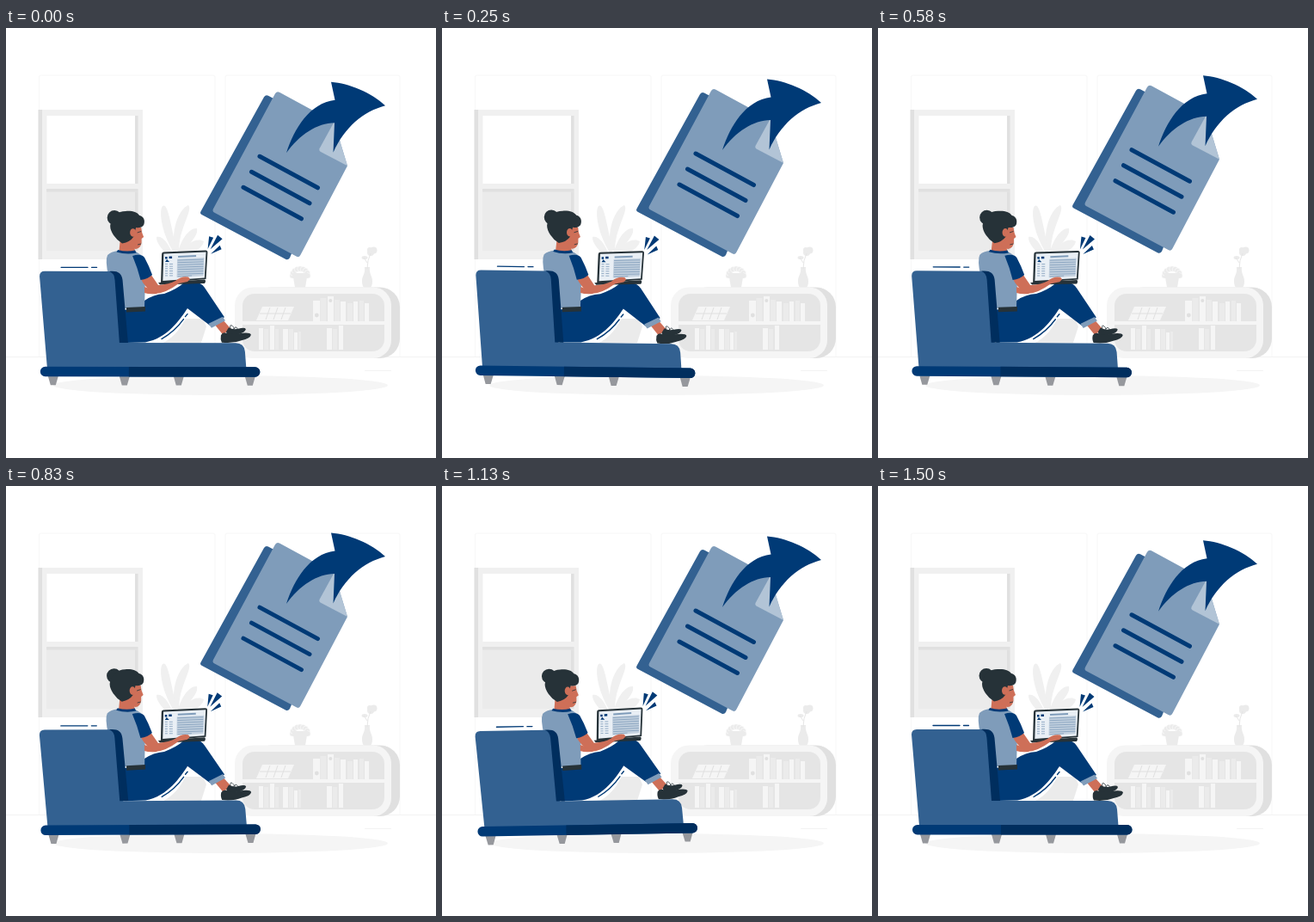
These frames come from a looping animation (500x500 px, 1540 ms). An HTML page:

```html
<!DOCTYPE html>
<html lang="en">
<head>
<meta charset="utf-8">
<title>Sharing a document from the sofa</title>
<style>
  html, body { margin: 0; width: 100%; height: 100%; overflow: hidden; background: #fff; }
  svg { display: block; width: 100%; height: 100%; }
  .navy { fill: #003a76; }
  .deep { fill: #002e5e; }
  .mid { fill: #336191; }
  .soft { fill: #7f9cba; }
  .dark { fill: #263238; }
  .skin { fill: #ce6f58; }
  .g1 { fill: #f5f5f5; }
  .g2 { fill: #f0f0f0; }
  .g3 { fill: #ebebeb; }
  .g4 { fill: #e0e0e0; }
  .line { fill: none; stroke: #003a76; stroke-linecap: round; }
</style>
</head>
<body>
<svg viewBox="0 0 500 500">
  <!-- Room -->
  <path d="M38.5 382V57q0-2 2-2H241q2 0 2 2V382M255 382V57q0-2 2-2H456q2 0 2 2V382" fill="none" stroke="#f7f7f7"/>
  <path d="M0 382.5H500M417 398.5H448" stroke="#f0f0f0" stroke-width=".8"/>

  <!-- Window -->
  <path class="g4" d="M37.5 95H60V269H37.5z"/>
  <path class="g2" d="M42 95H159V269H42z"/>
  <path fill="#fff" d="M47.5 102H150V181H47.5z"/>
  <path class="g4" d="M150 102h3.5v79H150zM47 187H153.5v4H47z"/>
  <path class="g3" d="M47 190.5H153.5V259H47z"/>
  <path class="g4" d="M150 190.5h3.5V259H150z"/>

  <!-- Potted plant -->
  <g class="g2">
    <path d="M196 262C182 242 177 213 182 207C189 202 192 235 199 258z"/>
    <path d="M197 258C191 238 200 211 212 206C218 212 201 232 201 260z"/>
    <path d="M194 264C189 249 181 241 175 243C174 250 184 260 192 268z"/>
    <path d="M199 264C203 246 213 232 222 233C224 243 211 251 203 267z"/>
    <path d="M201 268C208 250 222 243 230 248C228 259 213 261 203 272z"/>
  </g>
  <path class="g3" d="M176 338H229L233 347L227 366H181z"/>

  <!-- Bookshelf -->
  <rect class="g4" x="285" y="301.5" width="173" height="82.5" rx="23"/>
  <rect class="g1" x="266" y="301.5" width="182" height="82.5" rx="21"/>
  <rect x="275" y="309" width="165" height="67" rx="14" fill="#e5e5e5"/>
  <path class="g1" d="M275 341H440v4H275z"/>
  <path class="g1" d="M298 324H335L328 340H291z"/>
  <path d="M295 332H331M307 325L302 339M316 325L311 339M325 325L320 339" stroke="#e0e0e0" fill="none"/>
  <g id="books"></g>
  <g class="g4"><circle cx="361.3" cy="334" r="2.4"/><circle cx="377.3" cy="317" r="2"/></g>

  <!-- Ornaments -->
  <g class="g3">
    <path d="M334 290H350L348 301.5H336z"/>
    <g id="blooms"></g>
    <path d="M417 278H423C422 286 426 288 426 294Q426 301.5 423 301.5H417Q414 301.5 414 294C414 288 418 286 417 278z"/>
    <circle cx="424" cy="261" r="4"/><circle cx="427.5" cy="258.5" r="4"/><circle cx="423" cy="258" r="3"/>
    <ellipse cx="417" cy="267" rx="3.5" ry="2"/>
  </g>
  <path d="M420 280Q420 270 424 262M420 273L416 267" stroke="#e6e6e6" fill="none"/>

  <ellipse class="g1" cx="249.5" cy="415.5" rx="194.5" ry="11.5"/>

  <g id="sofa">
    <!-- Legs and shoes -->
    <path class="skin" d="M243 345L253 340L262 350L252 356z"/>
    <path class="dark" d="M256 353L259 348Q264 351 270 349.500Q278 347.500 279 350Q278 354 270 356L258 358z"/>
    <path class="dark" d="M250 357Q252 353 256 354.500Q263 357 271 355Q284 353 285 356.500Q284 361 274 363Q264 367 251 365.500Q249 362 250 357z"/>
    <path d="M261 349q-1-5 2-3t2 4q2-4 4-1t-3 2" fill="none" stroke="#263238" stroke-width=".8"/>
    <path fill="#fff" d="M160 366Q190 352 208 328L212 331Q201 357 183 366z"/>
    <path class="navy" d="M136 328L161 325V317Q171 310 184 309Q198 304 206 297L220 295.500Q227 296 231 302L254 336L237 345.500L211 326C203 338 188 361 162 365.500L138 366z"/>
    <path class="soft" d="M235.500 343.500L252 335.500L255 340L239 348.500z"/>
    <path class="line" d="M181 361.500Q196 353 206.500 338.500M208.500 335.500L211 332.500" stroke-width="1.4"/>

    <!-- Torso and head -->
    <path class="skin" d="M133 243H149V255L151 263H131z"/>
    <path class="soft" d="M130 259Q142 262 151 260L157 264L162 290L161 326H138L119 288Q115 270 118 264Q122 260 130 259z"/>
    <path class="navy" d="M130 258Q140 261 150 258.500L151.500 261.500Q140 264 128.500 260.500z"/>
    <path class="dark" d="M140 325L162 324V329.500L140 330.500z"/>
    <path class="skin" d="M144 232H157L158 238L160 243L157.500 245L157.500 250Q156 256.500 151 257Q144 257 141 249z"/>
    <path d="M152.500 238L157 236.500M153 252L157 251" stroke="#263238" stroke-width=".8"/>
    <circle class="dark" cx="126" cy="220.500" r="8.500"/>
    <path class="dark" d="M121 230C122 219 130 213 139 213C147 212.500 152 214 155 218C160 219 162 224 160 229Q157 233 151 232L148 243Q144 249 135 250.500Q129 247 125 241Q121 235 121 230z"/>
    <ellipse class="skin" cx="147.500" cy="238" rx="3.500" ry="4.800"/>

    <!-- Laptop -->
    <path class="dark" d="M177 296L231 292.500Q233 294 231 297L179 298.500z"/>
    <path class="dark" d="M183 260.500L232 258.500Q234.500 258.500 234.300 261L232.500 292L180 296.500L181 263Q181 260.700 183 260.500z"/>
    <path fill="#e9eff5" d="M183.300 262.500L232.500 260.500L230.800 290.500L182.300 294z"/>
    <path fill="#c3d1df" d="M199 268.500L230.500 267L229.500 288L198.500 290z"/>
    <g id="screen" fill="none" stroke="#7f9cba" stroke-width=".8"></g>
    <path class="navy" d="M185 266h2.500v2.500H185zM189.500 265.500h3.500v2.500h-3.500zM185 272l2-3 3 3z"/>

    <!-- Arm -->
    <path class="skin" d="M161 301L170 304L176 309Q166 310 161 308z"/>
    <path class="skin" d="M156 290L168 286L177 299Q190 298 197 294Q204 288 212 289.500L214 292L211 295L201 297Q185 309 173 309Q161 302 156 290z"/>
    <path class="navy" d="M147 265Q157 262 161 267Q166 276 170 287Q165 292 156.500 293Q153 279 147 265z"/>

    <!-- Sparks -->
    <path class="navy" d="M234.500 257L236 242L241 243.500zM237.500 257L246 240.500L251.500 245zM238 262.500L248.500 252.500L250.500 257z"/>
    <path class="line" d="M64 278.500H95M99.500 278.500H105.500" stroke-width="1.3"/>

    <!-- Sofa body -->
    <path class="mid" d="M39 289Q39 283 45 283H121Q129 284 130 294L136 366H267Q277 366 278 376L279.500 395H48z"/>
    <path class="deep" d="M120 283C130 282 134.500 285 135.500 293L142 366H132L126.500 293Q126 285 120 283z"/>
    <g id="feet" fill="#96989d"></g>
    <rect class="navy" x="40" y="394" width="255.500" height="11.500" rx="5.700"/>
    <path class="deep" d="M143 394H289.800a5.750 5.750 0 0 1 0 11.500H143z"/>
  </g>

  <!-- Shared document -->
  <g id="doc">
    <path class="mid" d="M300 80Q302 77 305 78.500L388 123L330 267Q328 270 325 268.500L228 217Q225 215.500 226.500 213z"/>
    <path class="soft" d="M313 76Q315 73 318 74.500L381.500 109L397 160L342.500 263.500Q341 267 338 265.500L242.500 214.500Q239.500 213 241 210z"/>
    <path fill="#b2c4d6" d="M381.500 109L397 160L365.500 143.500Q363.500 142 364.500 140z"/>
    <path class="line" d="M295 149L362.500 185.500M285.500 167L353 203.500M276 185L343.500 221.500" stroke-width="5"/>
    <path class="navy" d="M378 62.500C399 64 425 75 441 90C415 97 394 115 380.500 144.500L382 110C362 110 341 124 326 145C335 117 353 87 382.500 83.500z"/>
  </g>
</svg>
<script>
const $ = id => document.getElementById(id);

// Each book: x, top, width
const book = bottom => ([x, top, w], i) =>
  `<path class="${i % 2 ? 'g3' : 'g1'}" d="M${x} ${top}h${w}V${bottom}h${-w}z"/>`;
const upper = [[357, 317, 8], [365.5, 314, 7], [374, 312, 7], [382, 316, 6], [389, 318, 6],
  [397, 320, 6], [404, 318, 5], [411, 317, 5], [417, 320, 5]];
const lower = [[294, 349, 5], [300, 350, 5], [307, 346, 5], [313, 350, 4], [322, 350, 6],
  [329, 350, 5], [335, 354, 4], [340, 353, 3], [373, 349, 6], [380, 350, 5], [387, 346, 5]];
$('books').innerHTML = upper.map(book(341)).join('') + lower.map(book(374)).join('');

$('blooms').innerHTML = Array.from({ length: 9 }, (_, i) => {
  const a = Math.PI * (1 + i / 8);
  return `<circle cx="${342 + 9 * Math.cos(a)}" cy="${288 + 8 * Math.sin(a)}" r="3.2" stroke="#fff" stroke-width=".5"/>`;
}).join('') + '<path d="M333 285H351V291H333z"/>';

$('feet').innerHTML = [55, 138, 201, 284].map(x =>
  `<path d="M${x - 6} 405h12l-3 10.5h-6z"/>`).join('');

const rows = Array.from({ length: 8 }, (_, i) => 269 + i * 2.7);
$('screen').innerHTML =
  rows.map((y, i) => `<path d="M199.5 ${y + 1}L${i === 7 ? 216 : 229.5} ${y}"/>`).join('') +
  rows.slice(2).map(y => `<path d="M185 ${y}h3m2 0h4"/>`).join('') +
  '<path d="M200 266L221 265" stroke-width="2"/>';

const LOOP = 1540, LEAD = 40, REST = 0.8;

// Triangle wave: 0, 1, 0, -1, 0 over one turn
const sway = p => 1 - Math.abs(((p + 0.25) % 1) * 4 - 2);

function draw(ms) {
  const p = ((ms + LEAD) % LOOP) / LOOP;
  const lift = 10 * (1 - Math.abs(2 * p - 1));
  $('doc').setAttribute('transform', `translate(0 ${REST - lift})`);
  $('sofa').setAttribute('transform', `rotate(${sway(p)} 167.5 314)`);
}

const start = performance.now();
function tick() {
  draw(performance.now() - start);
  requestAnimationFrame(tick);
}
tick();
</script>
</body>
</html>
```
